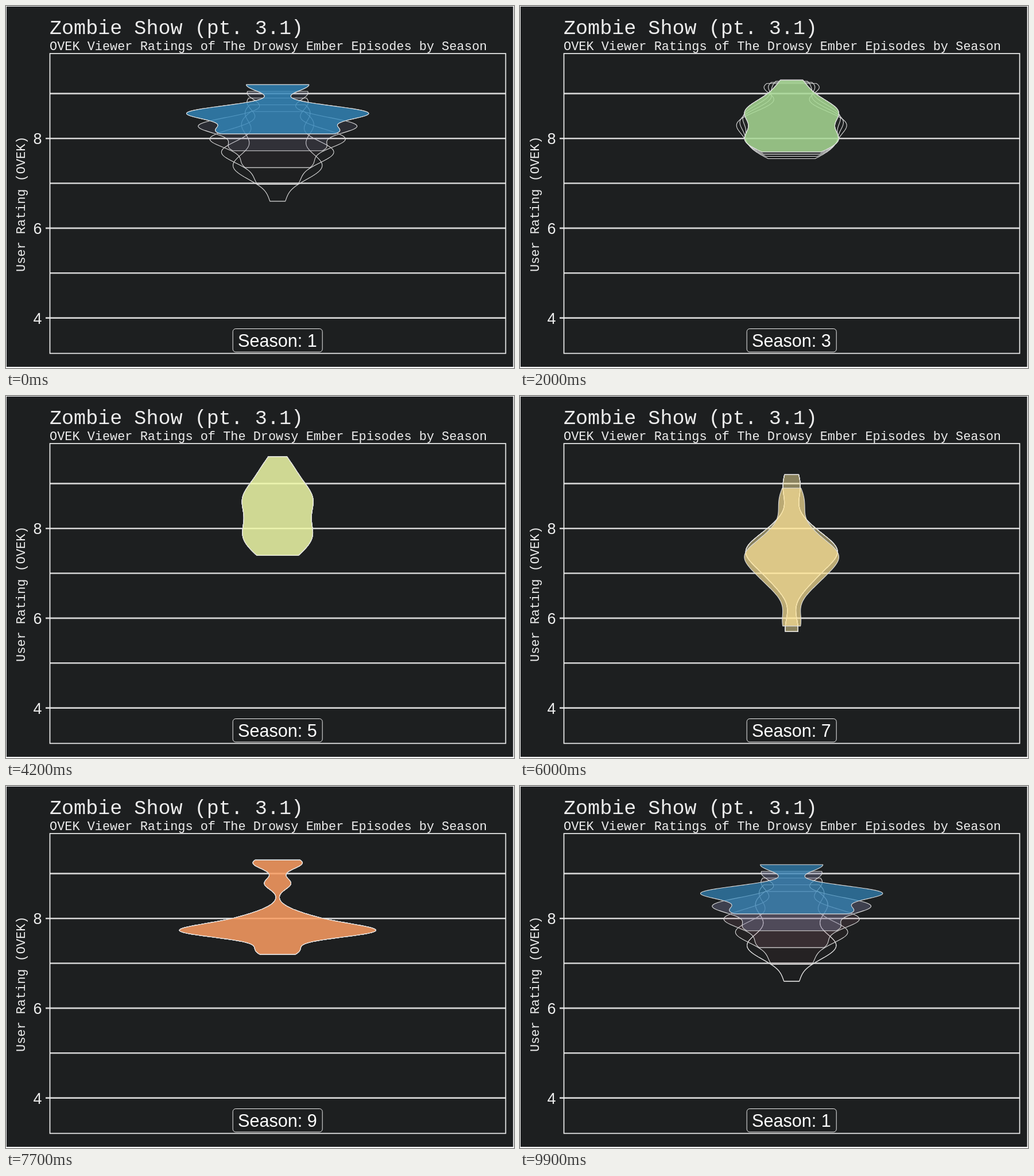
Animation of 885 by 632 pixels, one loop 10000 ms. Source, as an HTML page:

```html
<!DOCTYPE html>
<html lang="en">
<head>
<meta charset="utf-8">
<title>Zombie Show</title>
<style>
  html, body { margin: 0; width: 100%; height: 100%; overflow: hidden; background: #fff; }
  svg { display: block; }
  text { fill: #ededed; font-family: "Liberation Sans", Arial, sans-serif; font-kerning: none; }
  .mono { font: 21.9px "Liberation Mono", "Courier New", monospace; }
  .axis { font-size: 27px; text-anchor: end; }
  #grid { stroke: #d6d6d6; stroke-width: 2.6; }
  #wake path { stroke: #dedede; stroke-width: 1.1; stroke-linejoin: round; }
  #label { font-size: 30.6px; text-anchor: middle; fill: #fff; }
</style>
</head>
<body>
<svg width="885" height="632" viewBox="0 0 885 632">
  <rect x="1" y="1" width="882.5" height="629" fill="#1d1f20"/>
  <text class="mono" x="76" y="49" style="font-size:35.1px">Zombie Show (pt. 3.1)</text>
  <text class="mono" x="76" y="77">OVEK Viewer Ratings of The Drowsy Ember Episodes by Season</text>
  <text class="mono" transform="translate(33 464) rotate(-90)">User Rating (OVEK)</text>
  <g id="grid"></g>
  <g id="wake"></g>
  <rect x="76.5" y="83" width="794" height="523.5" fill="none" stroke="#f0f0f0" stroke-width="1.7"/>
  <rect id="box" y="563.5" height="40.5" rx="5" fill="#1d1f20" stroke="#f0f0f0"/>
  <text id="label" x="473" y="595"></text>
</svg>
<script>
const CX = 473.2, FRAME = 100, COUNT = 100, WAKE = 5, REST = 5, ALPHA = 0.7;
const $ = id => document.getElementById(id);
const mix = (a, b, u) => a + (b - a) * u;
const mixColor = (a, b, u) => `color-mix(in lab, ${a}, ${b} ${u * 100}%)`;
const ratingY = r => 231.2 - (r - 8) * 78.35;

// One spectral ramp across all seasons
const ramp = ["#3288bd", "#99d594", "#e6f598", "#ffffbf", "#fee08b", "#fc8d59", "#d53e4f"];
function rampColor(p) {
  const i = Math.min(5, Math.floor(p * 6));
  return mixColor(ramp[i], ramp[i + 1], p * 6 - i);
}

// A season: lowest and highest rating, then density bumps as [rating, spread, half width]
const seasons = [];
function season(lo, hi, ...bumps) {
  seasons.push({ lo, hi, bumps, color: rampColor(seasons.length / 10) });
}
season(8.1, 9.2, [8.15, 0.16, 102], [8.567, 0.16, 155], [9.2, 0.1525, 54.5]);
season(7.5, 9.2, [7.72, 0.25, 52], [8.28, 0.28, 97], [9.13, 0.17, 55]);
season(7.7, 9.3, [7.95, 0.28, 77], [8.6, 0.27, 74], [9.15, 0.27, 20]);
season(7.4, 9.6, [8.15, 0.34, 107], [9.3, 0.4, 26]);
season(7.4, 9.6, [7.8, 0.42, 57], [8.7, 0.38, 54], [9.38, 0.3, 17]);
season(6.9, 9.6, [7, 0.3, 14], [8, 0.5, 64], [9.3, 0.35, 22]);
season(5.7, 9.2, [5.75, 0.3, 11], [6.9, 0.35, 28], [7.53, 0.36, 73], [8.1, 0.25, 11], [8.95, 0.4, 15]);
season(6.2, 8, [6.2, 0.2, 20], [6.95, 0.35, 92], [7.7, 0.3, 45]);
season(7.2, 9.3, [7.28, 0.14, 36], [7.71, 0.15, 146], [7.97, 0.19, 58], [8.78, 0.13, 23], [9.24, 0.14, 43]);
season(4.1, 9.2, [4.1, 0.32, 7], [5.65, 0.35, 7], [7.55, 0.55, 69], [9.1, 0.35, 13]);
season(6.6, 8.6, [6.6, 0.2, 9.5], [7.38, 0.32, 76], [8.33, 0.35, 62]);

function widthAt({ lo, hi, bumps }, t) {
  const r = mix(lo, hi, t);
  return bumps.reduce((sum, [c, s, h]) => sum + h * Math.exp(-(((r - c) / s) ** 2) / 2), 0);
}

// Step at which each season is reached; it rests there before moving on
const arrive = [0, 10, 19, 28, 38, 47, 55, 64, 73, 82, 91, COUNT];
function pose(frame) {
  const g = (frame + 1 + COUNT) % COUNT;
  const i = arrive.findIndex((a, k) => g >= a && g < arrive[k + 1]);
  const leave = arrive[i] + REST;
  return { from: i, to: (i + 1) % 11, u: Math.max(0, (g - leave) / (arrive[i + 1] - leave)) };
}

function outline(a, b, u) {
  const left = [], right = [], steps = 140;
  const lo = mix(a.lo, b.lo, u), hi = mix(a.hi, b.hi, u);
  for (let k = 0; k <= steps; k++) {
    const t = k / steps, w = mix(widthAt(a, t), widthAt(b, t), u);
    const y = ratingY(mix(lo, hi, t)).toFixed(2);
    left.push((CX - w).toFixed(2) + " " + y);
    right.unshift((CX + w).toFixed(2) + " " + y);
  }
  return "M" + left.concat(right).join("L") + "Z";
}

const make = (parent, tag, attrs, text = "") => {
  const el = document.createElementNS("http://www.w3.org/2000/svg", tag);
  for (const k in attrs) el.setAttribute(k, attrs[k]);
  el.textContent = text;
  return parent.appendChild(el);
};

for (let r = 4; r <= 9; r++) {
  const y = ratingY(r), major = r % 2 === 0;
  make($("grid"), "path", { d: `M${major ? 69 : 76.5} ${y}H870` });
  if (major) make($("grid").parentNode, "text", { class: "axis", x: 62.5, y: y + 10 }, r);
}
const shapes = Array.from({ length: WAKE + 1 }, () => make($("wake"), "path", {}));

function draw(frame) {
  shapes.forEach((shape, k) => {
    const lag = WAKE - k, { from, to, u } = pose(frame - lag);
    const a = seasons[from], b = seasons[to];
    shape.setAttribute("d", outline(a, b, u));
    shape.style.fill = mixColor(a.color, b.color, u);
    shape.style.fillOpacity = ALPHA * (1 - lag / WAKE) ** 3;
  });
  const now = pose(frame), n = (now.u < 0.5 ? now.from : now.to) + 1;
  const w = n > 9 ? 173 : 156;
  $("label").textContent = "Season: " + n;
  $("box").setAttribute("x", CX - w / 2);
  $("box").setAttribute("width", w);
}

const start = performance.now();
let shown = -1;
function tick() {
  const frame = Math.floor((performance.now() - start) / FRAME) % COUNT;
  if (frame !== shown) draw(shown = frame);
  requestAnimationFrame(tick);
}
tick();
</script>
</body>
</html>
```
